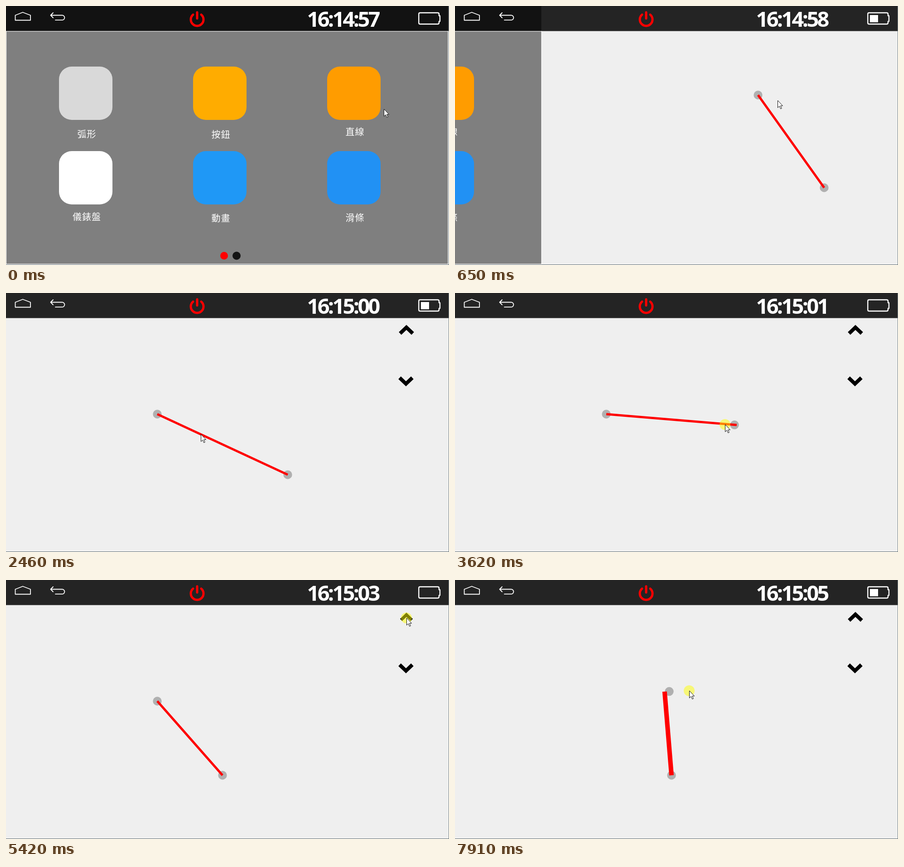
Animation of 978x573 px, one loop 8 s. Source, as an HTML page with a canvas:

```html
<!DOCTYPE html>
<html lang="zh-Hant">
<head>
<meta charset="utf-8">
<style>
  html, body { margin: 0; width: 100%; height: 100%; overflow: hidden; background: #efefef; }
  canvas { display: block; }
</style>
</head>
<body>
<canvas id="stage" width="978" height="573"></canvas>
<script>
const ctx = document.getElementById('stage').getContext('2d');
const W = 978, H = 573, BAR = 55.5, LOOP = 8000, STEP = 164.8;
const KNOB_LAG = 0.39, LINE_LAG = 0.48;

// Pointer waypoints: [step, x, y]; the knobs follow it while dragged
const waypoints = [
  [0, 834, 228], [3, 767, 185], [4, 712, 209], [9, 479, 192],
  [10, 476, 197], [14, 334, 268],
  [17, 622, 402], [21, 650, 293], [22, 596, 291], [25, 478, 432],
  [28, 806, 103], [31, 884, 84], [36, 884, 84], [40, 884, 199], [42, 884, 199],
  [44, 334, 268], [47, 404, 249], [48, 517, 245],
];
const presses = [[10, 13], [17, 25], [33, 36], [45, 48]];

const tiles = [
  ['#d9d9d9', '弧形', 283], ['#ffac00', '按鈕', 284], ['#ff9c00', '直線', 278],
  ['#ffffff', '儀錶盤', 466], ['#1f98f6', '動畫', 469], ['#2191f4', '滑條', 468],
];

const clamp = (v, lo, hi) => Math.min(hi, Math.max(lo, v));
const smooth = u => (u = clamp(u, 0, 1), u * u * (3 - 2 * u));

function pointer(s) {
  const i = clamp(waypoints.findIndex(p => p[0] > s), 0, waypoints.length);
  const b = waypoints[s >= 48 ? waypoints.length - 1 : i];
  const a = waypoints[Math.max(0, waypoints.indexOf(b) - 1)];
  const f = (s - a[0]) / (b[0] - a[0]);
  return [a[1] + (b[1] - a[1]) * f, a[2] + (b[2] - a[2]) * f];
}

const endA = s => pointer(s < 44 ? clamp(s, 10, 14) : s);
const endB = s => pointer(clamp(s, 17, 25));

function rect(x, y, w, h, color) {
  ctx.fillStyle = color;
  ctx.fillRect(x, y, w, h);
}

function disc(x, y, r, color) {
  ctx.fillStyle = color;
  ctx.beginPath();
  ctx.arc(x, y, r, 0, 7);
  ctx.fill();
}

function stroke(path, color, width, cap = 'butt', join = 'miter') {
  Object.assign(ctx, { strokeStyle: color, lineWidth: width, lineCap: cap, lineJoin: join });
  ctx.stroke(new Path2D(path));
}

function text(str, x, y, font, spacing, align) {
  Object.assign(ctx, { font, letterSpacing: spacing, textAlign: align, fillStyle: '#fff' });
  ctx.fillText(str, x, y);
}

function menuPage(x) {
  ctx.save();
  ctx.translate(x, 0);
  rect(0, 0, 975.5, BAR, '#121212');
  rect(0, BAR, 977, 572 - BAR, '#fff');
  rect(1, BAR + 1, 974.5, 569.5 - BAR, '#7f7f7f');
  tiles.forEach(([color, label, labelY], i) => {
    const left = 117 + 296 * (i % 3), top = 134 + 187 * Math.floor(i / 3);
    ctx.fillStyle = color;
    ctx.beginPath();
    ctx.roundRect(left, top, 118, 118, 28);
    ctx.fill();
    text(label, left + 61.5, labelY + 7.5,
      '20px "Noto Sans CJK TC", "Noto Sans CJK", "Noto Sans CJK JP", sans-serif', '1px', 'center');
  });
  disc(481.5, 552.5, 8.5, '#f00');
  disc(509, 552.5, 9, '#141414');
  ctx.restore();
}

function chevron(x, y, dir, pressed) {
  ctx.save();
  ctx.translate(x, y);
  if (pressed) ctx.scale(0.84, 0.84);
  ctx.scale(1, dir);
  stroke('M-14 7L0 -6.5L14 7', '#000', 8);
  ctx.restore();
}

function linePage(x, s, tapped) {
  ctx.save();
  ctx.translate(x, 0);
  for (const end of [endA, endB]) disc(...end(s - KNOB_LAG), 9.7, '#b0b0b0');
  const t = s - LINE_LAG;
  stroke(`M${endA(t)}L${endB(t)}`, '#f00', clamp(s - 28, 5, 10));
  chevron(884, 82.5, 1, tapped);
  chevron(883, 194.5, -1, false);
  ctx.restore();
}

function statusBar(t) {
  stroke('M20.5 20.5L37 14L54 20.5V31.5H20.5Z', '#fff', 1.8, 'round', 'round');
  stroke('M104 15L98.5 20.5L104 26M98.5 20.5H124A5.3 5.3 0 0 1 124 31.2H109', '#fff', 1.8, 'round', 'round');
  stroke('M413 19.2A14 14 0 1 0 431 19.2M422 14V27.5', '#f00', 5, 'round');

  const sec = 57 + Math.floor((t + 950) / 1000);
  const clock = `16:${14 + Math.floor(sec / 60)}:${String(sec % 60).padStart(2, '0')}`;
  text(clock, 664.5, 45.5, 'bold 47px "Open Sans", "Noto Sans", sans-serif', '-3.7px', 'left');

  stroke('M914 15H953Q956 15 956 18V21.5H958V34H956V37Q956 40 953 40H914Q911.3 40 911.3 37V18Q911.3 15 914 15Z',
    '#fff', 2.4, 'butt', 'round');
  const level = Math.floor((t + 150) / 366) % 5;
  if (level) rect(916, 20, 2 + 8 * level, 16, '#fff');
}

function cursor(x, y, pressed) {
  if (pressed) disc(x, y, 12, 'rgba(255,255,0,.5)');
  ctx.save();
  ctx.translate(x + 0.5, y);
  const arrow = 'M0 0V16L3.7 12.6L6.3 18.5L8.8 17.4L6.2 11.8H11Z';
  ctx.fillStyle = '#fff';
  ctx.fill(new Path2D(arrow));
  stroke(arrow, '#111', 1);
  ctx.restore();
}

function draw(now) {
  // The screen refreshes in coarse steps
  const s = Math.floor((now % LOOP + 25) / STEP);
  const x = -W * smooth((s - 2.615) / 1.937);
  const [px, py] = pointer(s);
  const pressed = presses.some(([a, b]) => s >= a && s <= b);

  rect(0, 0, W, H, '#efefef');
  rect(0, 0, W, BAR, '#242424');
  linePage(W + x, s, pressed && py < 130);
  if (x > -W) menuPage(x);
  rect(977, 0, 1, H, '#7b858b');
  rect(0, 572, W, 1, '#5b686f');
  statusBar(s * STEP);
  cursor(px, py, pressed);
  requestAnimationFrame(draw);
}
draw(0);
</script>
</body>
</html>
```
